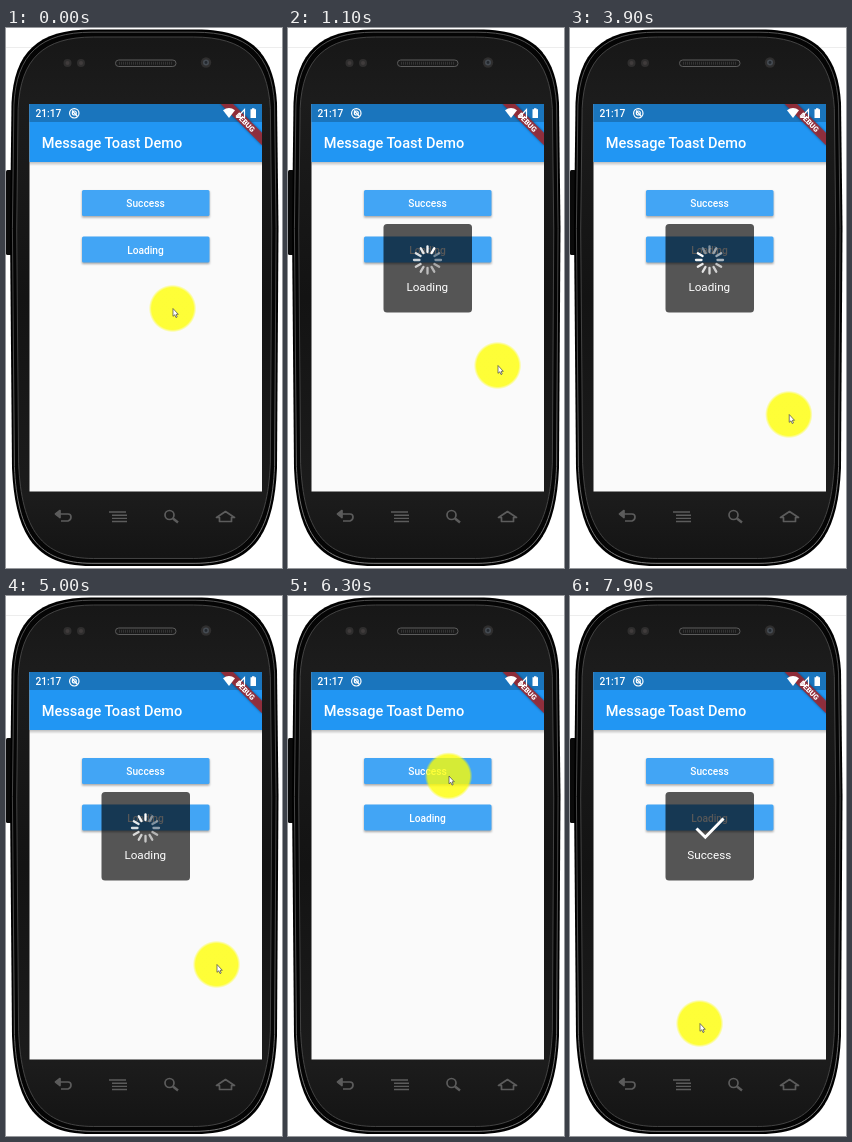
An HTML page for the animation above (8000 ms loop, 276x540 px).

```html
<!DOCTYPE html>
<html lang="en">
<head>
<meta charset="utf-8">
<title>Message Toast Demo</title>
<style>
  html, body { margin: 0; width: 100%; height: 100%; overflow: hidden; background: #fff; }
  svg { display: block; width: 100vw; height: 100vh; }
  text { font-family: Roboto, "Open Sans", sans-serif; fill: #fff; }
  .mid { text-anchor: middle; }
  .medium { font-weight: 500; }
  .label { font-size: 10.2px; font-weight: 500; text-anchor: middle; }
  .note { font-size: 11.7px; text-anchor: middle; }
  .key { fill: none; stroke: #5c5c5c; stroke-width: 1.7; stroke-linejoin: round; }
</style>
</head>
<body>
<svg viewBox="0 0 276 540" preserveAspectRatio="none">
  <defs>
    <path id="body" d="M85 1.500H190C244 1.500 268 24 271 75L272.500 200 271 440C268 508 246 538 190 538H85C30 538 9 508 6 440L4 200 5.500 75C8 24 32 1.500 85 1.500Z"/>
    <linearGradient id="face" x2="0" y2="1">
      <stop offset="0" stop-color="#171717"/>
      <stop offset=".12" stop-color="#1c1c1c"/>
      <stop offset=".5" stop-color="#131313"/>
      <stop offset=".88" stop-color="#1c1c1c"/>
      <stop offset="1" stop-color="#141414"/>
    </linearGradient>
    <linearGradient id="rim" x2="0" y2="1">
      <stop offset="0" stop-color="#5c5c5c"/>
      <stop offset=".5" stop-color="#4a4a4a"/>
      <stop offset="1" stop-color="#8c8c8c"/>
    </linearGradient>
    <linearGradient id="drop" x2="0" y2="1">
      <stop offset="0" stop-color="#000" stop-opacity=".24"/>
      <stop offset="1" stop-color="#000" stop-opacity="0"/>
    </linearGradient>
    <radialGradient id="glow">
      <stop offset="0" stop-color="#ff0" stop-opacity=".78"/>
      <stop offset=".88" stop-color="#ff0" stop-opacity=".78"/>
      <stop offset="1" stop-color="#ff0" stop-opacity="0"/>
    </radialGradient>
    <filter id="soft" x="-10%" y="-30%" width="120%" height="170%">
      <feGaussianBlur stdDeviation="1"/>
    </filter>
    <clipPath id="screen"><rect x="23.500" y="76" width="232.500" height="387.500"/></clipPath>
    <clipPath id="buttons">
      <rect x="76" y="162" width="127.500" height="26" rx="1.500"/>
      <rect x="76" y="208.500" width="127.500" height="26" rx="1.500"/>
    </clipPath>
  </defs>

  <rect width="276" height="540" fill="#fff"/>
  <rect y="19" width="276" height="1" fill="#ededed"/>

  <!-- phone -->
  <rect x="0" y="142" width="6" height="85" rx="1.500" fill="#0a0a0a"/>
  <use href="#body" fill="#000"/>
  <g transform="translate(138 269.500)">
    <use href="#body" transform="scale(.982 .99) translate(-138 -269.500)" fill="#050505" stroke="url(#rim)" stroke-width=".9"/>
    <use href="#body" transform="scale(.95 .972) translate(-138 -269.500)" fill="url(#face)" stroke="#4c4c4c" stroke-width=".9"/>
  </g>
  <rect x="109.500" y="32" width="60.500" height="6.500" rx="3.200" fill="#1a1a1a" stroke="#5c5c5c"/>
  <path d="M113 35.200H167" stroke="#343434" stroke-width="3" stroke-dasharray="1 1"/>
  <g fill="#2f2e2e">
    <circle cx="61.500" cy="35" r="4"/><circle cx="75" cy="35" r="4"/>
    <circle cx="61.500" cy="35" r="2" fill="#403c3c"/><circle cx="75" cy="35" r="2" fill="#403c3c"/>
    <circle cx="200" cy="34.500" r="5.200"/>
    <circle cx="200" cy="34.500" r="3" fill="#454b52"/>
    <circle cx="200" cy="34.500" r="1.400" fill="#23282e"/>
  </g>
  <g class="key">
    <path d="M52 486H62Q65 486 65 489T62 493H55"/>
    <path d="M54 482.500 49.500 486 54 489.500Z" fill="#5c5c5c"/>
    <path d="M103 484H120M106 487.300H121M106 490.400H121M106 493.500H121" stroke-width="1.400"/>
    <circle cx="163.500" cy="487" r="4.500"/>
    <path d="M167 490.500 172 494.500" stroke-width="2.400"/>
    <path d="M219.500 483.500 210.500 489.500H213.500V493.500H225.500V489.500H228.500Z"/>
  </g>

  <g clip-path="url(#screen)">
    <rect x="23" y="76" width="233" height="388" fill="#fafafa"/>
    <rect x="23" y="134" width="233" height="4" fill="url(#drop)"/>
    <rect x="23" y="76" width="233" height="58" fill="#2196f3"/>
    <rect x="23" y="76" width="233" height="18" fill="#1a75bd"/>
    <text class="medium" x="35.800" y="119.500" font-size="14.550">Message Toast Demo</text>

    <g filter="url(#soft)" fill="#000" opacity=".34">
      <rect x="76" y="163.500" width="127.500" height="26"/>
      <rect x="76" y="210" width="127.500" height="26"/>
    </g>
    <g fill="#42a5f5">
      <rect x="76" y="162" width="127.500" height="26" rx="1.500"/>
      <rect x="76" y="208.500" width="127.500" height="26" rx="1.500"/>
    </g>
    <g clip-path="url(#buttons)"><circle id="ripple" fill="#2a6a9c"/></g>
    <text class="label" x="139.500" y="179">Success</text>
    <text class="label" x="139.500" y="225.500">Loading</text>

    <g id="toast">
      <rect x="95.500" y="196" width="88.500" height="88.500" rx="3.500" fill="#000" fill-opacity=".66"/>
      <g id="busy">
        <g id="spinner" transform="translate(139.500 232)" stroke="#fff" stroke-width="2.300" stroke-linecap="round"></g>
        <text class="note" x="139.300" y="263">Loading</text>
      </g>
      <g id="done">
        <path d="M126.500 232.500 135.300 241.200 153.500 222.500" fill="none" stroke="#fff" stroke-width="3"/>
        <text class="note" x="139.300" y="263">Success</text>
      </g>
    </g>

    <g transform="translate(256 76) rotate(45)">
      <rect x="-29.200" y="20.400" width="58.400" height="8.800" filter="url(#soft)" opacity=".45"/>
      <rect x="-29.200" y="20.400" width="58.400" height="8.800" fill="#a52830" fill-opacity=".85"/>
      <text class="mid" x="1.200" y="27.400" font-size="7.400" font-weight="900">DEBUG</text>
    </g>

    <text class="medium" x="29.500" y="89" font-size="10.200">21:17</text>
    <g fill="none" stroke="#fff" stroke-width="1.200">
      <circle cx="68.300" cy="85.300" r="4.700"/>
      <circle cx="68.300" cy="85" r="2"/>
      <path d="M66 82.500 71.500 88.500"/>
      <path d="M238.500 81.500V89.500H231Z"/>
    </g>
    <g fill="#fff">
      <path d="M217 82.300Q223 77.800 229 82.300L223 90Z"/>
      <path d="M244.500 81.300H246V80.200H248.500V81.300H250V90H244.500Z"/>
    </g>
  </g>

  <g id="pointer">
    <circle cx="-.4" cy="-.5" r="23.800" fill="url(#glow)"/>
    <path d="M0-.5V7.300L1.800 5.800 3 8.600 4.200 8 3.100 5.300H5.300Z" fill="#fff" stroke="#444" stroke-width=".7"/>
  </g>
</svg>
<script>
const LOOP = 8000, STEP = 100, TICKS = 12;
const $ = id => document.getElementById(id);

// time, x, y
const path = [
  [0, 167, 281], [100, 163, 272], [300, 145, 234], [500, 139, 222],
  [700, 139, 222], [800, 146, 238], [1100, 210, 338], [1300, 220, 375],
  [1500, 223.5, 387], [2500, 220, 387], [4300, 219, 387], [4700, 214, 382],
  [5000, 211, 369], [5100, 212, 357], [5500, 226, 310], [5900, 247, 257],
  [6000, 246, 236], [6200, 182, 188], [6400, 140, 173], [7100, 140, 173],
  [7200, 142, 190], [7500, 142, 310], [7700, 135, 392], [7900, 130, 428]
];

// start, end, kind
const toasts = [[700, 5700, 'busy'], [7100, LOOP, 'done']];
// start, x, y
const taps = [[700, 139, 222], [7100, 140, 174]];

const ticks = Array.from({ length: TICKS }, (_, i) => {
  const line = document.createElementNS('http://www.w3.org/2000/svg', 'path');
  line.setAttribute('d', 'M0-8V-13.500');
  line.setAttribute('transform', `rotate(${i * 360 / TICKS})`);
  return $('spinner').appendChild(line);
});

function pointAt(t) {
  const i = path.findIndex(p => p[0] > t);
  if (i < 0) return path[path.length - 1].slice(1);
  const [t0, x0, y0] = path[i - 1], [t1, x1, y1] = path[i];
  const k = (t - t0) / (t1 - t0);
  return [x0 + (x1 - x0) * k, y0 + (y1 - y0) * k];
}

function show(el, on) {
  el.style.display = on ? '' : 'none';
}

function drawRipple(t) {
  const tap = taps.find(([s]) => t >= s && t < s + 400);
  show($('ripple'), tap);
  if (!tap) return;
  const [start, x, y] = tap, k = (t - start) / 400;
  const set = (name, value) => $('ripple').setAttribute(name, value);
  set('cx', x);
  set('cy', y);
  set('r', 37 + 45 * k);
  set('opacity', 0.35 * (1 - k));
}

function draw(t) {
  $('pointer').setAttribute('transform', `translate(${pointAt(t)})`);
  const toast = toasts.find(([a, b]) => t >= a && t < b);
  show($('toast'), toast);
  for (const kind of ['busy', 'done']) show($(kind), toast && toast[2] === kind);
  const head = Math.floor(t / 1000 * TICKS);
  ticks.forEach((tick, i) => {
    const age = ((head - i) % TICKS + TICKS) % TICKS;
    tick.setAttribute('opacity', 1 - 0.6 * age / (TICKS - 1));
  });
  drawRipple(t);
}

const begin = performance.now();
function frame(now) {
  const t = Math.max(0, now - begin) % LOOP;
  draw(Math.floor(t / STEP) * STEP);
  requestAnimationFrame(frame);
}
draw(0);
requestAnimationFrame(frame);
</script>
</body>
</html>
```
